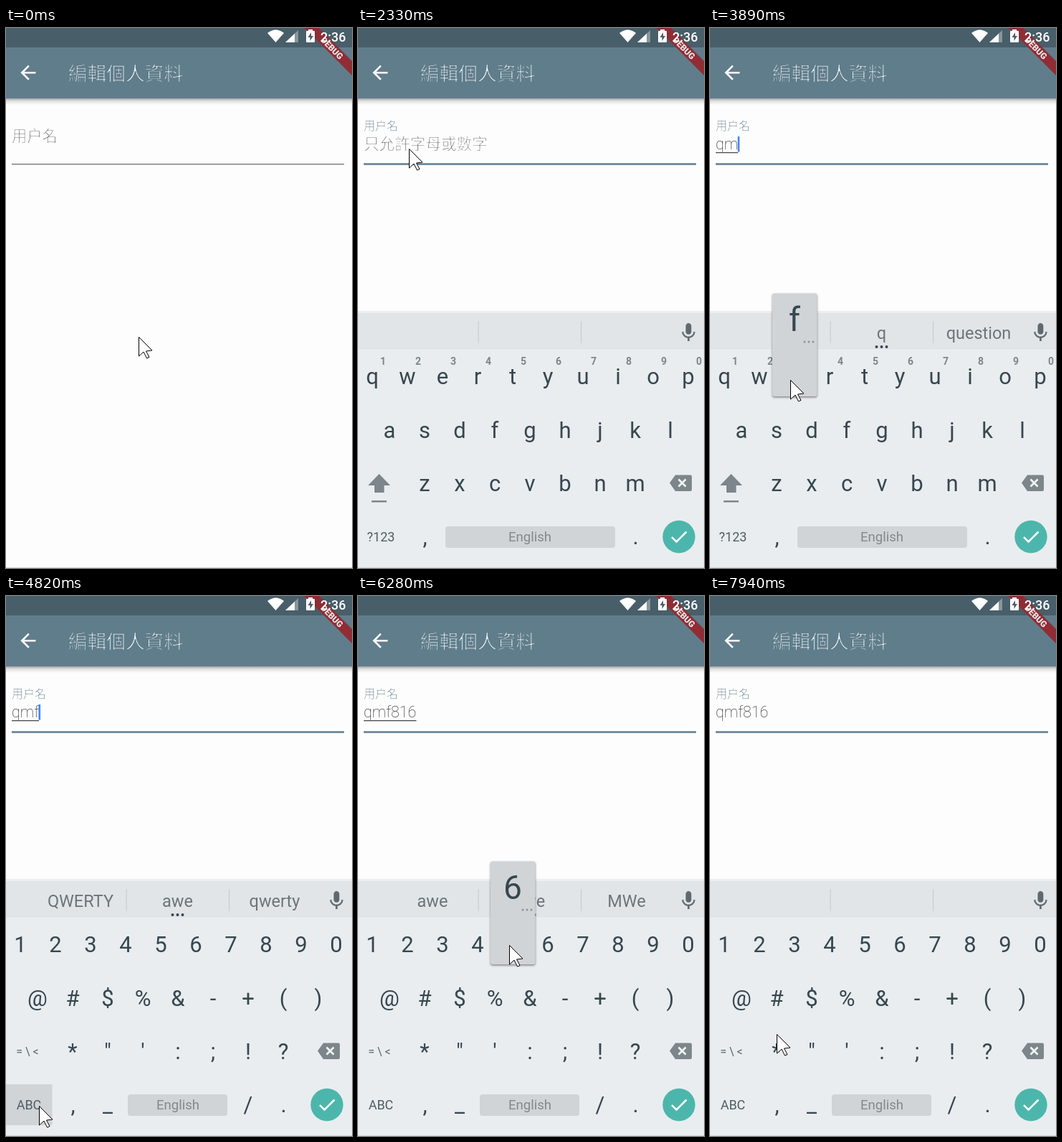
These frames come from a looping animation (483x752 px, 8 s). An HTML page with a canvas:

```html
<!DOCTYPE html>
<html lang="zh-Hant">
<head>
<meta charset="utf-8">
<title>編輯個人資料</title>
<style>
html, body { margin: 0; width: 100%; height: 100%; overflow: hidden; background: #fdfdfd; }
canvas { display: block; }
</style>
</head>
<body>
<canvas id="stage" width="483" height="752"></canvas>
<script>
const c = document.getElementById('stage').getContext('2d');
const LOOP = 8000, FOCUS = 1790, BLINK = 472, OPEN = 1930;
const TYPE_DELAY = 120, POPUP_TIME = 270;
const PAGE = '#fdfdfd', BAR = '#607d8b', INK = '#37474f', KEY = '#d0d4d7', GREY = '#7c868b';
const FACE = 'Roboto, "Noto Sans CJK TC", "Noto Sans CJK", sans-serif';
const NAME = 'qmf816';

// Pointer stops: time, x, y
const stops = [
  [700, 185, 430], [930, 101, 229], [1200, 71, 168], [2330, 71, 167], [2960, 49, 491],
  [3360, 49, 493], [3890, 112, 490], [4130, 116, 490], [4520, 71, 694], [4670, 46, 710],
  [4820, 46, 710], [5300, 122, 490], [5730, 189, 488], [6010, 210, 486], [6280, 211, 486],
  [6820, 114, 634], [6970, 114, 643], [7400, 39, 722], [7670, 46, 711], [7940, 93, 610]
];
// Key presses: time, character, column, row
const presses = [
  [3080, NAME[0], 0, 0], [3500, NAME[1], 1, 0], [3890, NAME[2], 2, 0], [5300, NAME[3], 2, 0],
  [5890, NAME[4], 3, 0], [6160, NAME[5], 4, 0], [6820, '"', 1, 2]
];
const hints = [
  [0, ''], [3500, 'Q q question'], [4130, 'QWERTY awe qwerty'], [5730, 'awe owe MWe'], [6970, '']
];
const rows = {
  letters: ['qwertyuiop', 'asdfghjkl', 'zxcvbnm'],
  symbols: ['1234567890', '@#$%&-+()', '*"\':;!?']
};
const keyX = (col, row) => [20, 44, 93][row] + 49 * col;
const within = (t, from, span) => t >= from && t < from + span;

function pointer(t) {
  const i = stops.findIndex(s => s[0] > t);
  if (i < 1) return i ? stops.at(-1).slice(1) : stops[0].slice(1);
  const [t0, x0, y0] = stops[i - 1], [t1, x1, y1] = stops[i];
  const k = (t - t0) / (t1 - t0);
  return [Math.round(x0 + (x1 - x0) * k), Math.round(y0 + (y1 - y0) * k)];
}

function text(s, x, y, size, color, weight = 400, align = 'center') {
  c.font = `${weight} ${size}px ${FACE}`;
  c.textAlign = align;
  c.fillStyle = color;
  c.fillText(s, x, y);
}
// Hairline lettering: trims the glyph edges with the background colour.
function thin(s, x, y, size, color, back) {
  text(s, x, y, size, color, 100, 'left');
  c.strokeStyle = back;
  c.lineWidth = size * .043;
  c.lineJoin = 'round';
  c.strokeText(s, x, y);
}
function rect(x, y, w, h, color, r = 0) {
  c.fillStyle = color;
  c.beginPath();
  c.roundRect(x, y, w, h, r);
  c.fill();
}
function dot(x, y, r, color) {
  c.fillStyle = color;
  c.beginPath();
  c.arc(x, y, r, 0, 7);
  c.fill();
}
function path(d, fill, x = 0, y = 0, scale = 1) {
  c.save();
  c.translate(x, y);
  c.scale(scale, scale);
  c.fillStyle = fill;
  c.fill(new Path2D(d));
  c.restore();
}
function line(d, color, width) {
  c.strokeStyle = color;
  c.lineWidth = width;
  c.lineJoin = 'miter';
  c.stroke(new Path2D(d));
}

function bars() {
  const g = c.createLinearGradient(0, 98, 0, 107);
  g.addColorStop(0, 'rgba(0,0,0,.36)');
  g.addColorStop(.4, 'rgba(0,0,0,.12)');
  g.addColorStop(1, 'rgba(0,0,0,0)');
  rect(0, 98, 483, 9, g);
  rect(0, 27, 483, 71, BAR);
  rect(0, 0, 483, 27, '#485e68');
  path('M20 11H7.83l5.59-5.59L12 4l-8 8 8 8 1.41-1.41L7.83 13H20z', '#fff', 15.2, 46.5, 1.31);
  thin('編輯個人資料', 87, 73, 26.7, '#fff', BAR);

  path('M417 0H437L483 46V66z', '#8f2d35');
  c.save();
  c.translate(455, 28);
  c.rotate(Math.PI / 4);
  text('DEBUG', 0, 4.3, 12, '#f0e4e5', 900);
  c.restore();

  path('M376.5 20L365 7Q376.5-2 388 7z', '#fff');
  path('M408 3V20H390z', 'rgba(255,255,255,.35)');
  path('M403 7.7V20H390z', '#fff');
  rect(419, 4, 12, 16, '#fff', 1);
  rect(422, 2, 6, 3, '#fff');
  path('M426 6L421.5 13H424.5V18L429 11H426z', '#485e68');
  text('2:36', 439, 18.5, 18, '#fff', 500, 'left');
}

function field(t) {
  const open = t >= OPEN;
  const count = presses.filter(p => t >= p[0] + TYPE_DELAY).length;
  const entry = NAME.slice(0, count);
  const size = open ? 16 : t >= FOCUS ? 20.3 : 21.3;
  thin('用户名', 8, 102 + size * (open ? 2.5 : 2.63), size, open ? '#607d8b' : '#777', PAGE);
  if (open) rect(8, 188.3, 464, 2.5, '#5f7d93');
  else rect(8, 189, 464, 1.3, '#6a6c6e');
  if (open && t < 3360) thin('只允許字母或數字', 8, 169, 21.6, '#777', PAGE);
  text(entry, 8, 169, 21.6, '#222', 100, 'left');
  const w = c.measureText(entry).width;
  if (t < 6970) rect(8, 173, w, 1.2, '#444');
  if (t >= FOCUS && Math.floor((t - FOCUS) / BLINK) % 2 === 0) rect(w + 7.5, 151, 2.6, 21.5, '#4285f4');
}

function strip(t) {
  rect(0, 394, 483, 3, '#eceeef');
  rect(0, 397, 483, 51, '#e1e5e8');
  for (const x of [167.5, 311]) rect(x, 408, 1, 31, '#c4c8cb');
  path('M12 14c1.66 0 3-1.34 3-3V5c0-1.66-1.34-3-3-3S9 3.34 9 5v6c0 1.66 1.34 3 3 3zm5.3-3c0 3-2.54 5.1-5.3 5.1S6.7 14 6.7 11H5c0 3.41 2.72 6.23 6 6.72V21h2v-3.28c3.28-.48 6-3.3 6-6.72z',
    '#5f6a70', 445.7, 408.5, 1.31);
  const words = hints.filter(h => h[0] <= t).pop()[1];
  if (!words) return;
  words.split(' ').forEach((s, i) => text(s, 104 + 135.5 * i, 433, 23.5, '#6d757a'));
  for (let i = -1; i < 2; i++) dot(239.5 + 7 * i, 444, 2, INK);
}

function popup(label, x, y) {
  c.save();
  c.shadowColor = 'rgba(0,0,0,.45)';
  c.shadowBlur = 3;
  c.shadowOffsetY = 1.5;
  rect(x - 31, y + .5, 62.5, 143.5, KEY, 3);
  c.restore();
  text(label, x, y + 53, 46, INK);
  for (let i = 0; i < 3; i++) dot(x + 14 + 6 * i, y + 68, 1.5, '#8f9497');
}

function keyboard(t) {
  const letters = t < 4820 || within(t, 6970, 580);
  rect(0, 448, 483, 303, '#e9edf0');
  rect(0, 447.5, 483, 1, '#f3f5f6');
  strip(t);

  if (within(t, 4820, 120) || within(t, 7550, 120)) rect(0, 680, 64.5, 57, KEY);
  rows[letters ? 'letters' : 'symbols'].forEach((keys, r) =>
    [...keys].forEach((k, i) => text(k, keyX(i, r), 496 + 74.5 * r, 31, INK)));

  if (letters) {
    for (let i = 0; i < 10; i++) text((i + 1) % 10, 35 + 49 * i, 469, 14, GREY, 700);
    path('M29.5 621L45 637H36.5V647H23V637H14z', GREY);
    rect(19, 658, 21, 2.5, GREY);
    rect(122, 694, 237, 30, KEY, 4);
  } else {
    text('= \\ <', 30, 640, 16, '#5f6a70');
    text('_', 142, 719, 31, INK);
    text('/', 338, 719, 31, INK);
    rect(170, 694, 139, 30, KEY, 4);
  }
  path('M435 633.5L443 622.5H464Q466 622.5 466 624.5V643Q466 645 464 645H443z', GREY);
  line('M447.5 628.5l10 10m0-10l-10 10', '#f2f4f5', 2.6);
  text(letters ? '?123' : 'ABC', 32, 715, 18, '#505d64');
  text(',', 93.5, 719, 31, INK);
  text('.', 387.5, 719, 31, INK);
  text('English', 240, 714.5, 18.6, '#85898c');
  dot(448, 708.5, 22.7, '#4db6ac');
  line('M438 709l6.5 6.5 14-14', '#fff', 2.6);

  for (const [from, label, col, row] of presses)
    if (within(t, from, POPUP_TIME)) popup(label, Math.max(31, keyX(col, row)), 369 + 73.5 * row);
}

function draw(t) {
  rect(0, 0, 483, 752, PAGE);
  bars();
  field(t);
  if (t >= OPEN) keyboard(t);
  rect(0, 751, 483, 1, '#d5d7d8');
  const [x, y] = pointer(t);
  const arrow = 'M0 0V26.5L6.5 20.5 11 29.5 14.5 28 10 19.5 18.5 18.5z';
  c.save();
  c.translate(x + .5, y + .5);
  path(arrow, '#fff');
  line(arrow, '#000', 1);
  c.restore();
}

function tick() {
  draw(performance.now() % LOOP);
  requestAnimationFrame(tick);
}
tick();
</script>
</body>
</html>
```
